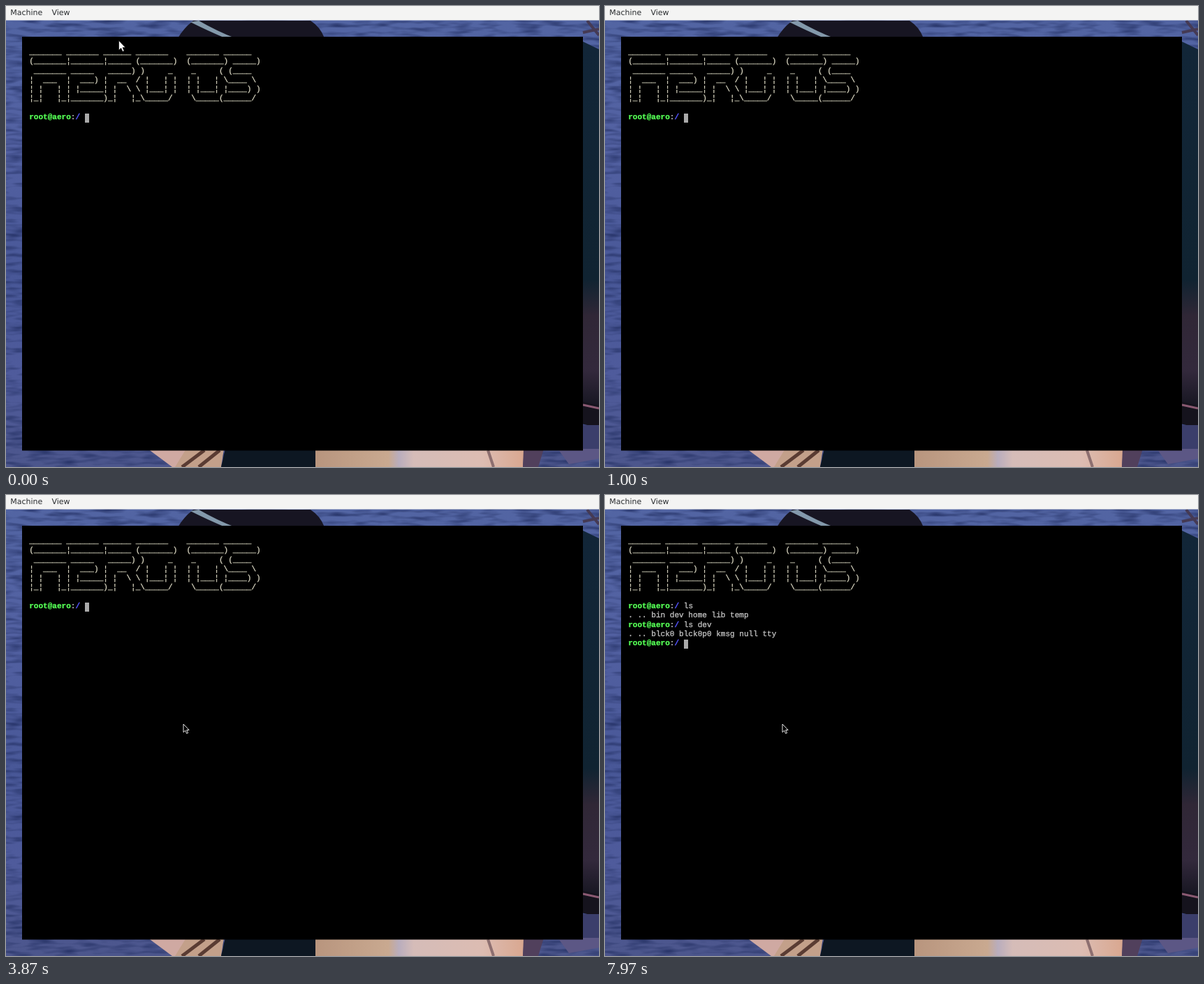
These frames come from a looping animation (849x660 px, 8 s). An HTML page:

```html
<!DOCTYPE html>
<html lang="en">
<head>
<meta charset="utf-8">
<title>Terminal session</title>
<style>
  html, body { margin: 0; width: 100%; height: 100%; overflow: hidden; background: #000; }
  #stage { position: relative; width: 849px; height: 660px; overflow: hidden; }
  svg { position: absolute; left: 0; top: 0; }
  #menu span {
    position: absolute; top: 3px; color: #2a2d30;
    font: 11px/14px "DejaVu Sans", sans-serif; text-rendering: geometricPrecision;
  }
  #terminal {
    position: absolute; left: 33.2px; top: 61px; margin: 0; color: #c4c4c4;
    font: 11.05px/13.3px "Liberation Mono", monospace;
    text-rendering: geometricPrecision; font-variant-ligatures: none;
    -webkit-text-stroke: .3px;
  }
  .art { color: #dcd9c4; }
  .host { color: #5f5; }
  .path { color: #55f; font-weight: bold; }
  .block {
    display: inline-block; position: relative; top: -.4px; width: 6.7px; height: 13.2px;
    background: #aaa; vertical-align: top;
  }
</style>
</head>
<body>
<div id="stage">
  <svg width="849" height="660" viewBox="0 0 849 660">
    <defs>
      <linearGradient id="wall" x2="0" y2="1">
        <stop offset="0" stop-color="#5265a3"/>
        <stop offset=".3" stop-color="#5361a2"/>
        <stop offset=".6" stop-color="#485797"/>
        <stop offset=".8" stop-color="#4f5b9c"/>
        <stop offset="1" stop-color="#4c568c"/>
      </linearGradient>
      <linearGradient id="side" x2="0" y2="1">
        <stop offset="0" stop-color="#122638"/>
        <stop offset=".65" stop-color="#102331"/>
        <stop offset=".75" stop-color="#302736"/>
        <stop offset=".9" stop-color="#33293c"/>
        <stop offset="1" stop-color="#151520"/>
      </linearGradient>
      <linearGradient id="skin">
        <stop offset="0" stop-color="#b8957e"/>
        <stop offset=".35" stop-color="#c9a990"/>
        <stop offset=".4" stop-color="#b9adbd"/>
        <stop offset=".47" stop-color="#d5bcb8"/>
        <stop offset=".8" stop-color="#dcbcb2"/>
        <stop offset="1" stop-color="#d9a78f"/>
      </linearGradient>
      <filter id="streaks" x="0" y="0" width="1" height="1" color-interpolation-filters="sRGB">
        <feTurbulence type="fractalNoise" baseFrequency=".03 .16" numOctaves="2" seed="4"/>
        <feColorMatrix values="0 0 0 0 .13  0 0 0 0 .18  0 0 0 0 .38  1.8 0 0 0 -.75"/>
      </filter>
    </defs>
    <rect width="849" height="660" fill="url(#wall)"/>
    <rect width="849" height="660" filter="url(#streaks)"/>
    <path d="M268 21H436Q450 30 456 46H246Q254 32 268 21Z" fill="#171522"/>
    <path d="M264 23L276 21Q302 36 328 46H314Q290 36 264 23Z" fill="#8399ab"/>
    <path d="M832 21L849 42M826 38L849 33" stroke="#453a54" stroke-width="4"/>
    <path d="M824 50L849 62V575H824Z" fill="url(#side)"/>
    <path d="M824 566L849 572V604L824 598Z" fill="#15131d"/>
    <path d="M826 571L849 576" stroke="#8a5a72" stroke-width="3"/>
    <path d="M824 600H849V636H824Z" fill="#3b3e6b"/>
    <path d="M203 634H262L248 660H238Z" fill="#cfa9a2"/>
    <path d="M258 634H312L308 660H242Z" fill="#c3a08a"/>
    <path d="M252 660L284 636M276 660L306 636" stroke="#5a3c33" stroke-width="5"/>
    <path d="M314 634H445V660H308Z" fill="#0d1722"/>
    <path d="M443 634H742L740 660H443Z" fill="url(#skin)"/>
    <path d="M690 636L698 660" stroke="#8d6f70" stroke-width="4"/>
    <path d="M741 634H770L762 660H740Z" fill="#51405c"/>
    <path d="M790 634H849V648L806 656Z" fill="#5c5785"/>
    <rect x="23" y="44" width="803" height="592.5"/>
    <rect width="849" height="20.5" fill="#f4f4f3"/>
  </svg>
  <div id="menu">
    <span style="left:6.3px">Machine</span>
    <span style="left:65.5px">View</span>
  </div>
  <pre id="terminal"></pre>
  <svg width="849" height="660" viewBox="0 0 849 660">
    <path id="pointer" d="M0 0V13L3 10.2L5.2 15L7.3 14L5.2 9.4H9Z" stroke-linejoin="round"/>
  </svg>
</div>
<script>
const LOOP = 8000;
const terminal = document.getElementById('terminal');
const pointer = document.getElementById('pointer');

const banner = String.raw`_______ _______ ______ _______    _______ ______
(_______|_______|_____ (_______)  (_______) _____)
 _______ _____   _____) )     _    _     ( (____
|  ___  |  ___) |  __  / |   | |  | |   | \____ \
| |   | | |_____| |  \ \ |___| |  | |___| |____) )
|_|   |_|_______)_|   |_\_____/    \_____(______/`.replaceAll('|', '¦');

const prompt = '<b class="host">root@aero</b>:<span class="path">/</span> ';
const block = '<span class="block"></span>';

// Key times in ms, then when the output and the next prompt appear.
const commands = [
  { text: 'ls', keys: [4300, 4450], output: '. .. bin dev home lib temp', runs: 4800, done: 4850 },
  { text: 'ls dev', keys: [5760, 5900, 6050, 6220, 6330, 6450],
    output: '. .. blck0 blck0p0 kmsg null tty', runs: 6620, done: 6670 },
];

// Pointer stops: time, x, y. The white pointer leaves, the dark one comes back.
const guestPath = [[0, 161, 49], [360, 353, 269], [950, 680, 665]];
const hostPath = [[1850, 392, -18], [2000, 384, 1], [2400, 345, 100], [3000, 254, 328]];

function screenAt(t) {
  let html = `<span class="art">${banner}</span>\n\n${prompt}`;
  for (const { text, keys, output, runs, done } of commands) {
    html += text.slice(0, keys.filter(k => k <= t).length);
    if (t < runs) break;
    html += `\n${output}`;
    if (t < done) break;
    html += `\n${prompt}`;
  }
  return html + block;
}

function along(path, t) {
  const next = path.findIndex(stop => stop[0] > t);
  if (next < 0) return path.at(-1).slice(1);
  if (next === 0) return path[0].slice(1);
  const [t0, ...from] = path[next - 1], [t1, ...to] = path[next];
  const k = (t - t0) / (t1 - t0);
  return from.map((v, i) => v + (to[i] - v) * k);
}

function drawPointer(t) {
  const host = t >= 1850;
  const [x, y] = along(host ? hostPath : guestPath, t);
  pointer.setAttribute('transform', `translate(${x} ${y}) scale(${host ? 0.9 : 1.05})`);
  pointer.setAttribute('fill', host ? '#000' : '#fff');
  pointer.setAttribute('stroke', host ? '#fff' : '#000');
  pointer.setAttribute('stroke-width', host ? 1 : 0.6);
}

let shown = '';
function frame() {
  const t = performance.now() % LOOP;
  const html = screenAt(t);
  if (html !== shown) terminal.innerHTML = shown = html;
  drawPointer(t);
  requestAnimationFrame(frame);
}
frame();
</script>
</body>
</html>
```
